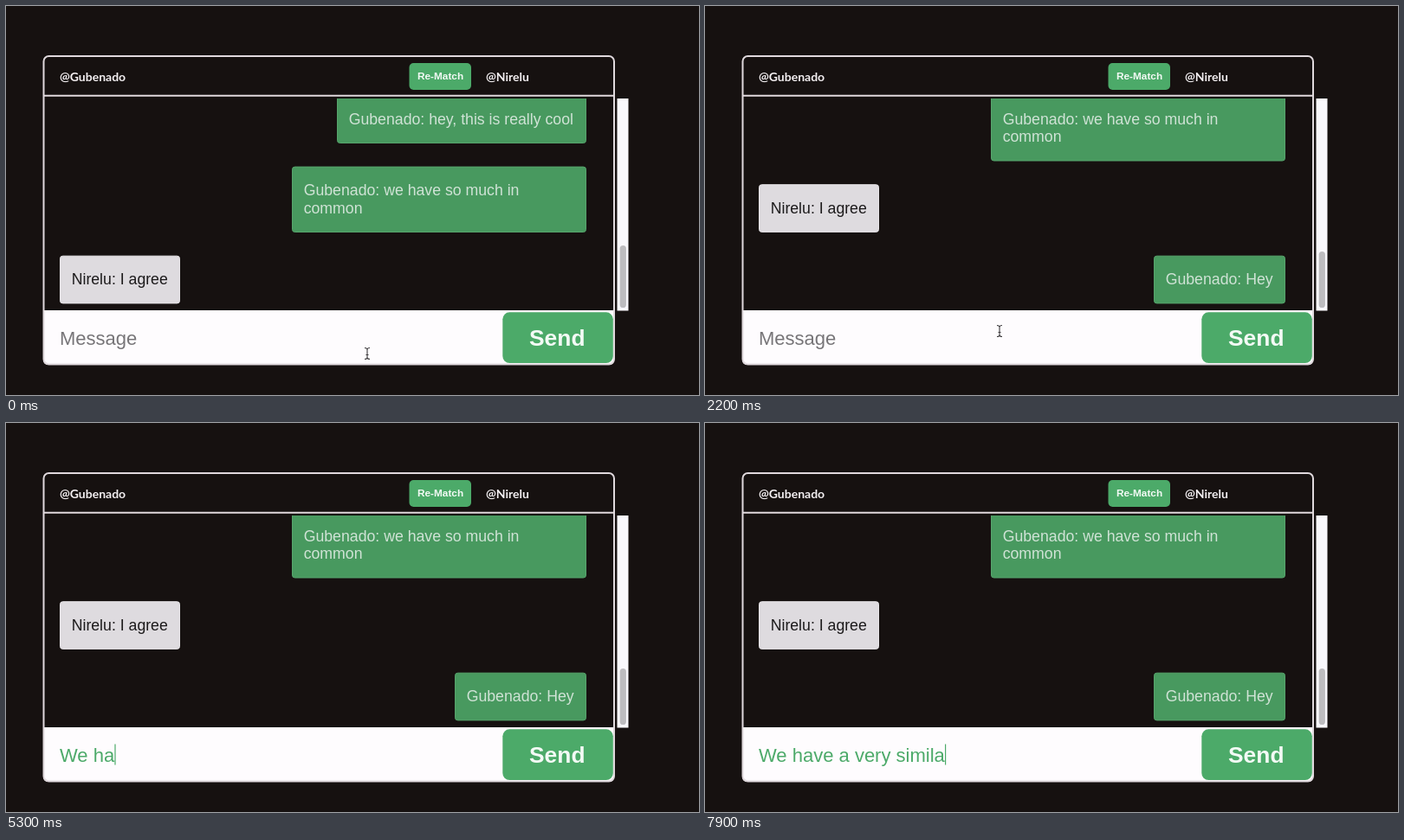
Write an HTML page that moves like this. It is 800 px wide and 450 px high and loops after 8000 ms.

```html
<!DOCTYPE html>
<html lang="en">
<head>
<meta charset="utf-8">
<title>Chat</title>
<style>
  html, body { margin: 0; width: 100%; height: 100%; overflow: hidden; background: #161110; }
  svg { display: block; width: 100%; height: 100%; }
  text { font-family: "Liberation Sans", Arial, sans-serif; white-space: pre; }
  .name { font: 700 14px Lato, sans-serif; fill: #f4f0f2; }
  .button { fill: #4caa69; }
  .label { font-weight: 700; fill: #f3faf5; }
  .bubble text { font-size: 17.7px; }
  .mine rect { fill: #48995f; stroke: #57a46c; }
  .mine text { fill: #d0e3d6; }
  .theirs rect { fill: #dedbdf; stroke: #e6e4e7; }
  .theirs text { fill: #1c1a1b; }
  #field { font-size: 22px; }
  .frame { fill: none; stroke: #e0d9dd; stroke-width: 2; }
</style>
</head>
<body>
<svg viewBox="0 0 800 450">
  <defs><clipPath id="viewport"><rect x="44" y="107" width="658" height="245"/></clipPath></defs>
  <rect width="800" height="450" fill="#161110"/>

  <g clip-path="url(#viewport)"><g id="messages"></g></g>

  <path d="M43 352H702V409Q702 415 696 415H49Q43 415 43 409Z" fill="#fefcfe"/>
  <rect class="frame" x="43.5" y="58" width="658.5" height="356.5" rx="6"/>
  <path class="frame" d="M44 103.7H702"/>

  <text class="name" x="62" y="86.5">@Gubenado</text>
  <rect class="button" x="465.5" y="66" width="71.5" height="31" rx="5"/>
  <text class="label" x="475" y="85.4" font-size="11.8">Re-Match</text>
  <text class="name" x="554" y="86.5">@Nirelu</text>

  <rect x="705.5" y="107" width="13" height="245.5" fill="#f9f8fc"/>
  <rect id="thumb" x="708.7" width="7.2" rx="3.6" fill="#bdbcbf"/>

  <text id="field" x="62" y="391.7"></text>
  <path id="caret" d="M0 371.5V395.5" stroke="#4caa69" stroke-width="1.2"/>
  <rect class="button" x="573.3" y="354.3" width="127.5" height="58.7" rx="8"/>
  <text class="label" x="604" y="393" font-size="26.4">Send</text>

  <g id="pointer">
    <g id="ibeam" fill="none">
      <path d="M-3 -6.5Q0 -6.5 0 -4.5Q0 -6.5 3 -6.5M0 -5V5M-3 6.5Q0 6.5 0 4.5Q0 6.5 3 6.5M-1.5 1.5H1.5" stroke="#3c3a3c" stroke-width="1.1"/>
    </g>
    <path id="arrow" d="M0 0V10.5L2.4 8.2L4.1 12.3L5.9 11.5L4.2 7.6H7.5Z" fill="#111" stroke="#fff" stroke-width=".8"/>
    <path id="hand" d="M-1.6 -5Q-3.6 -5.6 -3.3 -3.6L-2 1L-3.7 -.2Q-5.7 -.2 -4.8 1.6L-1.6 6.6H4.2L5.3 2.5V-.6Q4.7 -2 3.4 -1.1Q2.5 -2.3 1.2 -1.5Q.5 -2.2 -.3 -1.7Z" fill="#fff" stroke="#222" stroke-width="1.1"/>
  </g>
</svg>
<script>
const LOOP = 8000, STEP = 100, SENT = 2000, SCROLLED = 2200;
const $ = id => document.getElementById(id);
const field = $("field"), caret = $("caret"), thumb = $("thumb"), messages = $("messages");

// Bubble: side class, left, top, width, lines of text
const bubble = (side, x, y, w, ...lines) => `<g class="bubble ${side}">
  <rect x="${x + .5}" y="${y + .5}" width="${w - 1}" height="${34 + lines.length * 20.7}" rx="3"/>
  ${lines.map((s, i) => `<text x="${x + 13.7}" y="${y + 33.7 + i * 20.6}">${s}</text>`).join("")}</g>`;

messages.innerHTML =
  bubble("mine", 382, 103.3, 288, "Gubenado: hey, this is really cool") +
  bubble("mine", 330, 185.6, 340, "Gubenado: we have so much in", "common") +
  bubble("theirs", 62, 288.7, 139, "Nirelu: I agree") +
  bubble("mine", 518, 371.2, 152, "Gubenado: Hey");

// Each draft lists the moment of every key press
const drafts = [
  { text: "Hey", end: SENT, keys: [200, 500, 600] },
  { text: "We have a very simila", end: LOOP, keys: [
    4600, 4800, 4900, 5100, 5200, 5400, 5500, 5700, 5800, 6000,
    6200, 6300, 6400, 6500, 6700, 6900, 7000, 7200, 7400, 7500, 7800] }
];

// Pointer path: time, x, y, shape
const moves = [
  [0, 417, 402, "ibeam"], [200, 0, 0, ""],
  [1100, 440, 402, "ibeam"], [1400, 560, 402, "ibeam"], [1500, 600, 400, "hand"],
  [1600, 690, 408, "hand"], [1700, 730, 427, "arrow"], [1800, 712, 412, "arrow"],
  [1900, 668, 388, "hand"], [2000, 658, 386, "hand"], [2100, 658, 386, "hand"],
  [2200, 340, 376, "ibeam"], [2500, 326, 376, "ibeam"], [3200, 308, 375, "ibeam"],
  [4200, 306, 374, "arrow"], [4600, 0, 0, ""]
];

function drawField(t) {
  const draft = drafts.find(d => t >= d.keys[0] && t < d.end);
  field.textContent = "Message";
  field.setAttribute("fill", "#777578");
  caret.style.display = "none";
  if (!draft) return;
  const pressed = draft.keys.filter(k => k <= t);
  field.textContent = draft.text.slice(0, pressed.length);
  field.setAttribute("fill", "#4caa69");
  const idle = t - pressed[pressed.length - 1];
  if (idle % 1000 < 500) {
    caret.style.display = "";
    caret.setAttribute("transform", `translate(${62.8 + field.getComputedTextLength()} 0)`);
  }
}

function drawPointer(t) {
  const i = moves.findLastIndex(m => m[0] <= t);
  const [t0, x0, y0, shape] = moves[i];
  const next = moves[i + 1];
  const glide = next && next[3] === shape ? (t - t0) / (next[0] - t0) : 0;
  const mix = (a, b) => a + (b - a) * glide;
  const [x, y] = glide ? [mix(x0, next[1]), mix(y0, next[2])] : [x0, y0];
  $("pointer").setAttribute("transform", `translate(${x} ${y})`);
  for (const id of ["ibeam", "arrow", "hand"]) $(id).style.display = id === shape ? "" : "none";
}

function drawScroll(t) {
  const [y, height] = t < SENT ? [277, 72] : t < SCROLLED ? [261, 64.5] : [284, 65];
  thumb.setAttribute("y", y);
  thumb.setAttribute("height", height);
  messages.setAttribute("transform", `translate(0 ${t < SCROLLED ? 0 : -82.5})`);
}

function tick(now) {
  const t = Math.floor(now % LOOP / STEP) * STEP;
  drawField(t);
  drawPointer(t);
  drawScroll(t);
  requestAnimationFrame(tick);
}
tick(performance.now());
</script>
</body>
</html>
```
